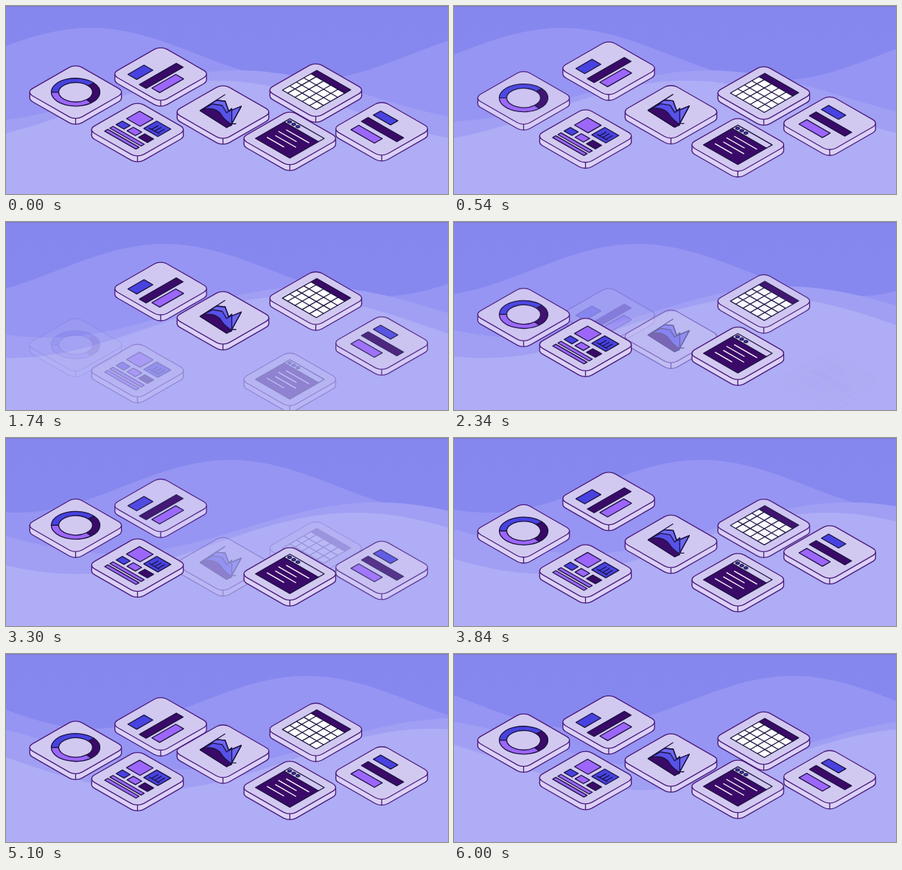
An HTML page for the animation above (6060 ms loop, 600 by 257 pixels).

```html
<!DOCTYPE html>
<html lang="en">
<head>
<meta charset="utf-8">
<title>Floating dashboard tiles</title>
<style>
  html, body { margin: 0; width: 100%; height: 100%; overflow: hidden; background: #8688ef; }
  svg { display: block; width: 100%; height: 100%; }
  .plane * { vector-effect: non-scaling-stroke; }
  .edge { stroke: #4b1a7c; stroke-width: 1.3; stroke-linejoin: round; }
  .ink { stroke: #1b1340; stroke-width: 1.3; stroke-linejoin: round; }
</style>
</head>
<body>
<svg id="stage" viewBox="0 0 600 257" preserveAspectRatio="none">
  <defs>
    <linearGradient id="haze" x1="0" y1="0" x2="0" y2="1">
      <stop offset="0" stop-color="#8587ee"/>
      <stop offset="1" stop-color="#898af0"/>
    </linearGradient>
  </defs>
  <rect width="600" height="257" fill="url(#haze)"/>
  <g id="waves"></g>
  <rect width="600" height="1" fill="#8078c4"/>
  <g id="tiles"></g>
</svg>
<script>
const LOOP = 6060, STEP = 60, BOB = 3000, FADE = 900, DRIFT = 0.0575;
const BLUE = '#4742e0', DARK = '#3a0a68', PURPLE = '#9d66fb';
const FACE = '#d2c9f1', SIDE = '#dbd2f7', WHITE = '#fff', INK = '#1b1340';
const ISO = 'matrix(.7071 .4082 -.7071 .4082 0 0)';
const TAU = Math.PI * 2;

// Shapes on the tile plane: a runs down-right, b runs down-left.
const rect = (a0, a1, b0, b1, fill, r = 0, cls = 'ink') =>
  `<rect x="${a0}" y="${b0}" width="${a1 - a0}" height="${b1 - b0}" rx="${r}" fill="${fill}" class="${cls}"/>`;
const line = (a0, b0, a1, b1, color) =>
  `<path d="M${a0} ${b0}L${a1} ${b1}" stroke="${color}" stroke-width="1.3"/>`;
const plane = (...parts) => `<g class="plane" transform="${ISO}">${parts.join('')}</g>`;
const shape = (d, fill) => `<path d="${d}" fill="${fill}" class="ink"/>`;

function ring(from, to, fill) {
  const at = (r, deg) => {
    const t = deg * TAU / 360;
    return `${(r * Math.cos(t)).toFixed(2)} ${(r * .577 * Math.sin(t)).toFixed(2)}`;
  };
  return shape(`M${at(33, from)}A33 19 0 0 1 ${at(33, to)}` +
    `L${at(23, to)}A23 13.3 0 0 0 ${at(23, from)}Z`, fill);
}

function donut() {
  return ring(180, 319, BLUE) + ring(-41, 50, DARK) + ring(50, 180, PURPLE);
}

function bars() {
  return plane(rect(-31, -14, 1, 32, BLUE), rect(-3, 10, -33, 38, DARK), rect(15, 30, -14, 32, PURPLE));
}

function barsMirrored() {
  return plane(rect(-31, 2, -29, -15, BLUE), rect(-32, 36, -6, 7, DARK), rect(-28, 17, 16, 31, PURPLE));
}

function dashboard() {
  const strokes = [13, 19, 25].map(a => line(a, -27, a, -14, INK));
  return plane(
    rect(-29, -3, -33, -8, PURPLE), rect(4, 31, -33, -8, BLUE),
    rect(-29, -14, 0, 12, BLUE), rect(-8, 8, 0, 12, PURPLE), rect(14, 31, 0, 12, DARK),
    rect(-29, 31, 18, 24, PURPLE), rect(-29, 31, 28, 34, PURPLE),
    ...strokes, line(8, -14, 28, -14, INK));
}

function mountains() {
  return shape('M-31-2L-9-16 3-15 8-1 25-8 12 16 5 21Z', '#6c66f4') +
    shape('M-31-2L-14-11-1-9 5 1 12-5 12 16 5 21Z', '#5751ea') +
    shape('M-31-2C-20-8-7-4-2 4C2 11 7 13 12 18L5 21Z', DARK) +
    '<path d="M-31-2L3-24M-9-16L3-15 8-1 25-8 12 16M9 16H18" fill="none" class="ink"/>';
}

function table() {
  const cols = [-22, -8, 6, 20], rows = [-9, 5, 18];
  return plane(rect(-32, 33, -23, 32, WHITE), rect(-32, 33, -34, -23, DARK),
    ...cols.map(a => line(a, -23, a, 32, INK)),
    ...rows.map(b => line(-32, b, 33, b, INK)));
}

function codeWindow() {
  return plane(rect(-33, 33, -22, 33, DARK), rect(-33, 33, -33, -22, FACE),
    ...[-28, -20, -12].map(a => `<circle cx="${a}" cy="-27.5" r="2.6" fill="${BLUE}" class="ink"/>`),
    line(-18, -11, 26, -11, WHITE), line(-23, -1, 12, -1, WHITE),
    line(-19, 9, 21, 9, WHITE), line(-24, 20, 9, 20, WHITE));
}

const body = `<g transform="translate(0 8)">${plane(rect(-47.5, 47.5, -47.5, 47.5, SIDE, 12, 'edge'))}</g>
  <rect x="-62.2" width="124.4" height="8" fill="${SIDE}"/>
  <path d="M-62.2 0V8M62.2 0V8M0 36V44" class="edge"/>
  ${plane(rect(-47.5, 47.5, -47.5, 47.5, FACE, 12, 'edge'))}`;

// y: mean centre, amp: bob height, low: time of lowest bob point,
// gone: middle of the absence, hold: half its hidden time, depth: sink distance.
const tiles = [
  { icon: bars,         x: 210,   y: 90,    amp: 7.5, low: 2450, gone: 2580, hold: 0,   depth: 36 },
  { icon: table,        x: 420.5, y: 111,   amp: 8,   low: 500,  gone: 3080, hold: 0,   depth: 38 },
  { icon: donut,        x: 94.5,  y: 125.5, amp: 7.7, low: 1490, gone: 1430, hold: 150, depth: 39 },
  { icon: mountains,    x: 294.5, y: 138.5, amp: 7.5, low: 250,  gone: 2870, hold: 120, depth: 36 },
  { icon: barsMirrored, x: 510,   y: 161,   amp: 8,   low: 2750, gone: 2550, hold: 150, depth: 49 },
  { icon: dashboard,    x: 178.5, y: 174.6, amp: 8.3, low: 1100, gone: 1440, hold: 0,   depth: 36 },
  { icon: codeWindow,   x: 385.3, y: 186.6, amp: 8.3, low: 1100, gone: 1440, hold: 0,   depth: 36 }
];
const waves = [
  { crest: 115, period: 580, y: 66,  amp: 36, fill: '#9695f3' },
  { crest: 315, period: 720, y: 123, amp: 35, fill: '#a09ff4' },
  { crest: 285, period: 760, y: 144, amp: 42, fill: '#aeadf5' }
];

function add(parent, tag, html = '') {
  const node = document.createElementNS('http://www.w3.org/2000/svg', tag);
  node.innerHTML = html;
  return document.getElementById(parent).appendChild(node);
}
for (const w of waves) {
  w.node = add('waves', 'path');
  w.node.setAttribute('fill', w.fill);
}
for (const t of tiles) t.node = add('tiles', 'g', body + t.icon());

const smooth = u => {
  u = Math.min(1, Math.max(0, u));
  return u * u * (3 - 2 * u);
};

function draw(time) {
  for (const w of waves) {
    let d = 'M0 257';
    for (let x = 0; x <= 600; x += 8) {
      const y = w.y - w.amp * Math.cos((x - w.crest - time * DRIFT) * TAU / w.period);
      d += `L${x} ${y.toFixed(2)}`;
    }
    w.node.setAttribute('d', d + 'V257Z');
  }
  for (const t of tiles) {
    const shown = smooth((Math.abs(time - t.gone) - t.hold) / FADE);
    const y = t.y + t.amp * Math.cos((time - t.low) * TAU / BOB) + t.depth * (1 - shown);
    t.node.setAttribute('transform', `translate(${t.x} ${y.toFixed(2)})`);
    t.node.setAttribute('opacity', shown.toFixed(3));
  }
}

const start = performance.now();
function tick() {
  const elapsed = (performance.now() - start) % LOOP;
  draw(Math.floor(elapsed / STEP) * STEP);
  requestAnimationFrame(tick);
}
tick();
</script>
</body>
</html>
```
